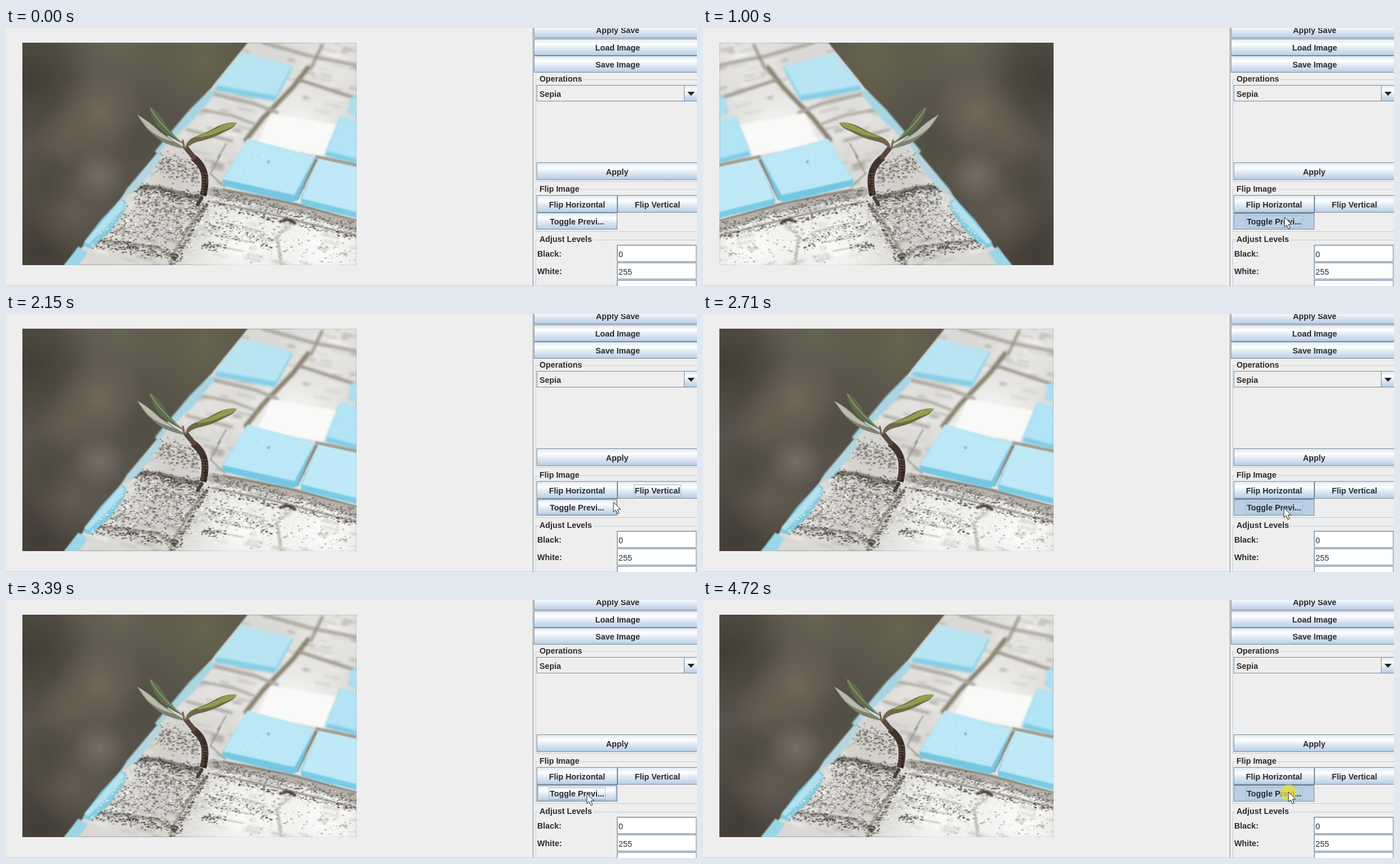
Animation, 1224 px wide and 457 px high, one loop 4860 ms. Source, as an HTML page with a canvas:

```html
<!DOCTYPE html>
<html lang="en">
<head>
<meta charset="utf-8">
<title>Image editor</title>
<style>
html, body { margin: 0; width: 100%; height: 100%; overflow: hidden; background: #eee; }
body { position: relative; font: bold 14.3px/18px "Liberation Sans", Arial, sans-serif; color: #2b2b2b; }
body * { position: absolute; box-sizing: border-box; white-space: nowrap; }
.button, .arrow {
  border: 1px solid #7a8a99;
  background: linear-gradient(#dde8f3, #fff 30%, #dde8f3 60%, #b8cfe5);
}
.button { display: flex; align-items: center; justify-content: center; }
.button span { position: relative; top: 1px; padding: 1px; border: 1px solid transparent; }
.hover { box-shadow: inset 0 0 0 2px #a9c1da; }
.pressed { background: #b8cfe5; box-shadow: inset 0 1px #7a8a99; }
.focus span { border-color: #a3b8cc; }
.group { border: 1px solid #b8cfe5; }
.group span { left: 4px; top: -11px; padding: 0 2px; background: #eee; }
.field { border: 1px solid #7a8a99; background: #fff; font-weight: 400; padding: 7px 2px; box-shadow: inset 1px 1px #b8cfe5; }
#divider { left: 933px; top: 0; width: 1px; height: 456px; background: #7a8a99; }
#bottom { left: 0; top: 456px; width: 100%; height: 1px; background: #cfcfcf; }
#photo { left: 29px; top: 26px; }
#glow { width: 28px; height: 28px; margin: -13px 0 0 -14px; border-radius: 50%; background: rgba(232, 226, 48, .75); }
#cursor { width: 16px; height: 24px; overflow: visible; }
</style>
</head>
<body>
<canvas id="photo" width="592" height="394"></canvas>
<div id="divider"></div>
<div id="bottom"></div>
<script>
const add = (cls, x, y, w, h, text) => {
  const el = document.createElement('div');
  el.className = cls;
  el.style.cssText = `left:${x}px;top:${y}px;width:${w}px;height:${h}px`;
  if (text) el.innerHTML = cls === 'button' || cls === 'group' ? `<span>${text}</span>` : text;
  document.body.append(el);
  return el;
};

add('group', 938, 91, 300, 181, 'Operations');
add('group', 938, 286, 300, 75, 'Flip Image');
add('group', 938, 375, 300, 120, 'Adjust Levels');
['Apply Save', 'Load Image', 'Save Image'].forEach((s, i) => add('button', 935, Math.round(-12 + i * 30.5), 297, 30, s));
add('field', 940, 101, 290, 29, 'Sepia').style.cssText += ';background:#eee;font-weight:700;padding:6px 4px;box-shadow:none';
add('arrow', 1201, 101, 24, 29, '<svg width="22" height="27"><path d="M5 11h13l-6.5 7z" fill="#222"/></svg>');
add('button', 940, 238, 285, 31, 'Apply');
const buttons = {
  H: add('button', 940, 296, 143, 31, 'Flip Horizontal'),
  V: add('button', 1083, 296, 142, 31, 'Flip Vertical'),
  T: add('button', 940, 327, 143, 30, 'Toggle Previ...')
};
[['Black:', '0'], ['White:', '255'], ['', '']].forEach(([name, value], i) => {
  const y = 384 + i * 31;
  add('label', 941, y + 7, 120, 18, name);
  add('field', 1082, y, 141, i < 2 ? 30 : 10, value);
});
const glow = add('', 0, 0, 28, 28);
glow.id = 'glow';
document.body.insertAdjacentHTML('beforeend',
  '<svg id="cursor"><path d="M0 0V17.5L4 14L7 21L10 19.7L7 13H12.5Z" fill="#fff" stroke="#222"/></svg>');

// Photograph, drawn in stage coordinates
const photo = document.getElementById('photo'), g = photo.getContext('2d');
g.translate(-29, -26);
let seed = 7;
const rnd = () => (seed = seed * 16807 % 2147483647) / 2147483647;
const spread = () => rnd() + rnd() - 1;
const blur = n => g.filter = n ? `blur(${n}px)` : 'none';
const shape = (d, fill) => { g.fillStyle = fill; g.fill(new Path2D(d)); };
const line = (d, color, width) => {
  g.strokeStyle = color;
  g.lineWidth = width;
  g.stroke(new Path2D(d));
};
const blob = (x, y, r, color) => {
  const grad = g.createRadialGradient(x, y, 0, x, y, r);
  grad.addColorStop(0, color);
  grad.addColorStop(1, color.slice(0, 7) + '00');
  g.fillStyle = grad;
  g.fillRect(x - r, y - r, 2 * r, 2 * r);
};
// Rough crumbs scattered along a band
const crumbs = (x0, y0, x1, y1, width, count, tone = '62,57,50') => {
  for (let i = 0; i < count; i++) {
    const u = rnd(), size = 1 + 2 * rnd();
    g.fillStyle = `rgba(${tone},${.2 + .5 * rnd()})`;
    g.fillRect(x0 + (x1 - x0) * u + 3 * spread(), y0 + (y1 - y0) * u + width * spread(), size * 1.5, size);
  }
};

function drawBackground() {
  shape('M29 26H621V420H29Z', '#58534a');
  blob(45, 90, 120, '#413f35ff');
  blob(60, 400, 140, '#423d34ff');
  blob(200, 30, 110, '#676555ee');
  blob(350, 50, 120, '#66644fff');
  blob(165, 150, 80, '#73685aee');
  blob(110, 190, 60, '#6b6052bb');
  blob(165, 262, 50, '#7b746acc');
  blob(245, 205, 60, '#504d42cc');
  blob(120, 330, 75, '#665f54cc');
  blob(70, 270, 60, '#4b473dcc');
}

function drawWall() {
  const wall = 'M428 26L370 98L330 150L268 222L205 300L138 385L103 420H621V26Z';
  blur(1);
  shape(wall, '#dad9d5');
  blur(0);
  g.save();
  g.clip(new Path2D(wall));
  blob(420, 385, 130, '#fafaf8ff');
  blob(560, 390, 130, '#fdfdfcff');
  blob(510, 190, 120, '#fafaf9ff');
  blob(580, 60, 100, '#e8e7e3ff');
  blob(360, 160, 70, '#e6e5e1cc');
  blob(290, 340, 90, '#c6c4bebb');
  blob(305, 255, 60, '#cac8c2bb');

  // Soft weathering along the courses
  g.lineCap = 'round';
  blur(2);
  for (let i = 0; i < 420; i++) {
    const x = 110 + 510 * rnd(), y = 26 + 394 * rnd(), n = 5 + 25 * rnd();
    const tone = rnd() < .55 ? '255,255,255' : '105,101,92';
    line(`M${x} ${y}l${n} ${n * .22}`, `rgba(${tone},${.1 + .25 * rnd()})`, 2 + 4 * rnd());
  }
  line('M535 70L508 105L455 160L425 198', '#86806c', 8);
  line('M455 26L540 50L621 66M365 116L440 134L480 150', '#aaa79f', 6);
  line('M520 92L621 125M540 72L560 30', '#989489', 5);
  line('M345 145L400 155L440 170M320 180L400 200', '#a3a098', 4);
  shape('M470 152L592 172L562 226L446 202Z', '#f9f9f8');
  blur(1);
  line('M230 281L272 283L320 296L345 300', '#85817a', 7);
  line('M365 290L430 300L530 322L621 352', '#b5b2ab', 17);
  line('M386 287L500 309L621 341', '#827e75', 3);
  line('M365 308L470 330L621 368', '#8b8880', 3);
  line('M380 225L362 258L388 282M390 205L375 230', '#96938a', 2);
  line('M355 312L322 355L297 400L290 420', '#9c988a', 5);
  line('M505 345L480 370L488 420', '#c9c5bb', 6);
  line('M160 376L225 382L270 390L300 409', '#a09d96', 5);
  line('M385 345L455 361M375 369L440 380M350 383L420 395', '#bcb9b3', 2);
  line('M486 343Q500 335 512 346', '#4f453a', 5);
  blur(0);

  crumbs(225, 280, 345, 303, 14, 330);
  crumbs(225, 305, 350, 325, 25, 420, '95,90,82');
  crumbs(175, 345, 330, 355, 40, 520, '95,90,82');
  crumbs(150, 376, 310, 405, 14, 330);
  crumbs(355, 312, 290, 420, 8, 140);
  crumbs(265, 240, 340, 255, 30, 260, '95,90,82');
  crumbs(365, 292, 621, 355, 14, 420, '95,90,82');
  crumbs(365, 312, 621, 372, 6, 170);
  crumbs(350, 345, 470, 375, 25, 150);
  crumbs(345, 385, 385, 388, 12, 60);
  crumbs(330, 320, 621, 410, 70, 330, '150,147,140');
  crumbs(180, 330, 621, 390, 60, 750, '255,255,255');
  g.restore();
}

function drawTiles() {
  blur(1.6);
  shape('M362 108L370 117L332 163L298 194L268 224L264 218L325 145Z', '#a9d5e2');
  shape('M266 224L278 227L235 284L205 302L214 285Z', '#b3d5df');
  blur(2);
  shape('M418 49L508 69L477 130L368 110L382 88Z', '#85cee5');
  shape('M418 44L507 67L478 120L370 101Z', '#b9e5f3');
  shape('M609 126L621 118V157L607 152Z', '#a9e0f2');
  shape('M592 160L621 166V240L565 226Z', '#7acae3');
  shape('M592 156L621 163V232L567 218Z', '#b2e4f5');
  blur(.8);
  line('M550 232L514 304', '#8b887d', 6);
  line('M548 228L621 243', '#a19e94', 6);
  shape('M428 199L547 229L516 305L506 309L384 279L383 270Z', '#74c7e2');
  shape('M428 196L547 228L511 296L384 268Z', '#bae7f6');
  shape('M554 235L621 250V337L523 313L522 302Z', '#7accE5');
  shape('M554 232L621 246V326L524 302Z', '#bfe9f7');
  shape('M205 301L214 310L209 324L188 356L151 391L136 386L140 377L168 340Z', '#80cae0');
  shape('M204 304L211 311L180 350L146 383L139 379Z', '#b4e1ee');
  shape('M128 387L145 398L129 420H103Z', '#9ad6e5');
  blur(0);
  blob(465, 237, 4, '#5ab2d0ee');
  crumbs(228, 290, 148, 388, 4, 60, '225,240,244');
  for (let i = 0; i < 260; i++) {
    const u = rnd(), v = rnd();
    g.fillStyle = `rgba(255,255,255,${.4 * rnd()})`;
    g.fillRect(427 + 116 * u - 41 * v, 199 + 29 * u + 69 * v, 2, 1.5);
  }
}

function drawSeedling() {
  blur(.5);
  line('M338 315L348 299', '#484038', 6);
  line('M349 297Q354 280 352 262Q349 242 331 229', '#42342c', 12);
  line('M335 232L318 211', '#5a473e', 9);
  for (let i = 0; i < 8; i++) line(`M346 ${257 + i * 5}l11 2`, '#75614f', 1);
  crumbs(350, 250, 352, 298, 3, 30, '35,26,22');
  shape('M319 214Q302 212 282 204Q250 186 232 153Q254 165 274 184Q296 200 319 214Z', '#7d826f');
  shape('M233 154Q254 166 272 184L298 202Q268 194 250 177Z', '#b9bbae');
  shape('M318 207Q293 196 276 182Q257 162 254 138Q275 152 285 174Q299 193 318 207Z', '#5f6b4d');
  line('M256 142Q271 170 309 201', '#98a47e', 1.5);
  shape('M318 214Q318 199 336 192Q356 185 375 174Q394 165 409 168Q405 177 387 184Q358 200 335 201Z', '#6f6a48');
  shape('M334 193Q362 185 385 171Q398 166 409 168Q404 176 382 182Q356 195 334 193Z', '#929d51');
  line('M316 214L313 198M318 212Q329 201 348 198', '#766353', 3);
  blur(0);
}

drawBackground();
drawWall();
drawTiles();
drawSeedling();

const LOOP = 4860;
// Pointer stops: time, x, y
const stops = [
  [70, 1036, 315], [280, 1032, 326], [340, 1030, 335],
  [1260, 1034, 333], [1330, 1048, 329], [1400, 1066, 324], [1470, 1088, 319],
  [1540, 1099, 320], [1610, 1105, 322], [1670, 1108, 319], [1740, 1111, 317],
  [2030, 1102, 322], [2100, 1076, 333], [2170, 1050, 339], [2240, 1034, 342],
  [2310, 1029, 343],
  [3720, 1031, 338], [3780, 1033, 331], [3980, 1035, 322], [4050, 1035, 318],
  [4120, 1035, 315], [4390, 1036, 324], [4450, 1036, 333], [4520, 1037, 340]
];
// Presses: button, down, glow off, up
const presses = [
  ['H', 140, 210, 210], ['T', 340, 400, 470], ['T', 930, 1000, 1070],
  ['V', 1810, 1880, 1950], ['T', 2570, 2640, 2780], ['T', 3240, 3390, 3390],
  ['H', 4190, 4260, 4320], ['T', 4720, LOOP, LOOP]
];
const cursor = document.getElementById('cursor');
const place = (el, x, y) => { el.style.left = x + 'px'; el.style.top = y + 'px'; };
const within = (t, a, b) => t >= a && t < b;

function render(t) {
  const stop = stops.findLast(s => s[0] <= t);
  const [focus, , glowEnd, up] = presses.findLast(p => p[1] <= t) || ['', 0, 0, 0];
  let hover = '';
  if (stop) {
    const [, x, y] = stop;
    hover = y >= 326 ? (x < 1083 ? 'T' : '') : x < 1083 ? 'H' : 'V';
    place(cursor, x, y);
    place(glow, x, y);
  }
  cursor.style.display = stop ? '' : 'none';
  glow.style.display = t < glowEnd ? '' : 'none';
  for (const id in buttons) {
    const list = buttons[id].classList, down = id === focus && t < up;
    list.toggle('focus', id === focus);
    list.toggle('pressed', down);
    list.toggle('hover', id === hover && !down);
  }
  photo.style.transform = within(t, 470, 1070) ? 'scaleX(-1)' : within(t, 2780, 3390) ? 'scaleY(-1)' : '';
}

const start = performance.now();
function tick() {
  render((performance.now() - start) % LOOP);
  requestAnimationFrame(tick);
}
tick();
</script>
</body>
</html>
```
